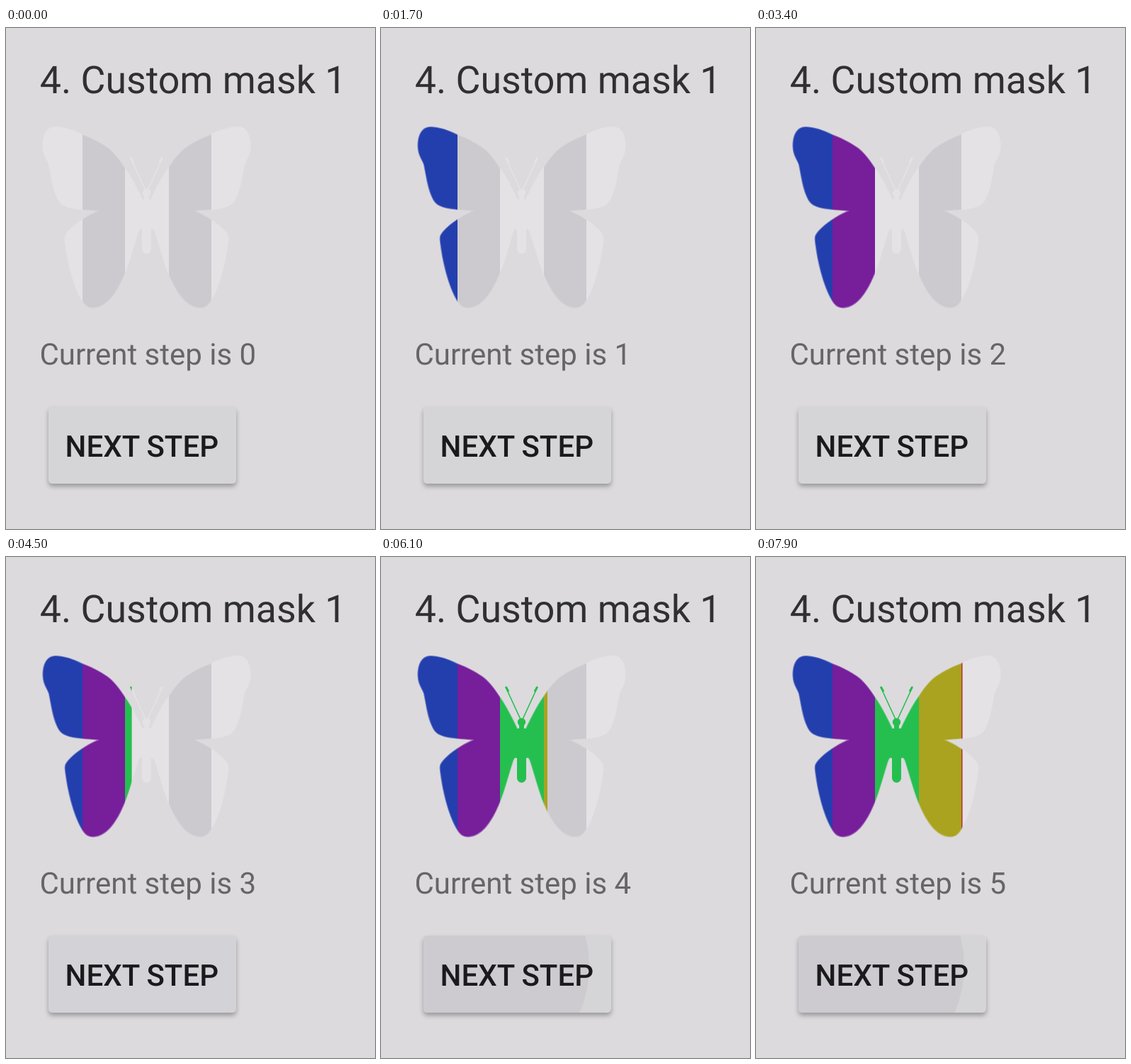
These frames come from a looping animation (521x707 px, 8 s). An HTML page with a canvas:

```html
<!DOCTYPE html>
<html lang="en">
<head>
<meta charset="utf-8">
<title>Custom mask steps</title>
<style>
  html, body { margin: 0; width: 100%; height: 100%; overflow: hidden; background: #dcdadd; }
  canvas, svg { position: absolute; left: 0; top: 0; width: 521px; height: 707px; }
  text { font-family: Roboto, sans-serif; text-rendering: geometricPrecision; }
</style>
</head>
<body>
<canvas id="stage" width="521" height="707"></canvas>
<svg viewBox="0 0 521 707">
  <text x="47.8" y="91.5" font-size="53.7" fill="#303033">4. Custom mask 1</text>
  <text id="label" x="47.4" y="475" font-size="42" fill="#666569">Current step is 0</text>
  <text x="83.6" y="604.7" font-size="42" font-weight="500" fill="#1a1a1c">NEXT STEP</text>
</svg>
<script>
const W = 521, H = 707, LOOP = 8000, TICK = 100;
const AXIS = 198.5;
const SPEED = 0.031; // px per ms
const EDGES = [48, 108, 168, 230, 290, 350];
const IDLE = ['#e4e2e5', '#cccacf'];
const COLORS = ['#233fae', '#771e9b', '#25bf4f', '#a9a31f', '#b92f2f'];

// press: button touched, start: fill begins, done: segment snaps to full
const STEPS = [
  { press: 600, start: 750, done: 1700 },
  { press: 2400, start: 2380, done: 3400 },
  { press: 4100, start: 4190, done: 5200 },
  { press: 6000, start: 5940, done: 7100 },
  { press: 7800, start: 7850, done: 9000 }
];

const ctx = document.getElementById('stage').getContext('2d');
const label = document.getElementById('label');
const layer = document.createElement('canvas');
layer.width = W;
layer.height = H;
const art = layer.getContext('2d');

const edge = `M193 242
  C188 232 179 212 168 197 C161 186 152 174 143 168
  C133 161 119 154 108 150 C96 144 82 139 70 139
  C58 139 51 150 51.5 168 C52 181 58 186 60 193
  C63 207 65 226 72 240 C76 249 81 251 90 254
  C101 257 114 257 128 258.5
  C115 264 98 275 88 286 C83 292 82 294 83 302
  C86 328 94 363 107 385 C111 392 116 395.5 123 395.5
  C143 395 157 374 168 347 C175 330 182 303 187 288
  Q189 283 191 284`;
const rim = new Path2D(edge);
const wing = new Path2D(edge + 'L198.5 284 L198.5 242 Z');

const antenna = new Path2D('M197 229 L176.5 184.5');
const tip = new Path2D('M179.5 189 L176.7 184');
const body = new Path2D();
body.arc(198.5, 233, 5.7, 0, 2 * Math.PI);
body.roundRect(195, 234, 7, 14, 2);
body.roundRect(192, 242, 13, 76.5, 6.5);

function bothSides(paint) {
  paint();
  art.save();
  art.translate(2 * AXIS, 0);
  art.scale(-1, 1);
  paint();
  art.restore();
}

function drawMask() {
  art.globalCompositeOperation = 'source-over';
  art.clearRect(0, 0, W, H);
  art.fillStyle = art.strokeStyle = '#000';
  art.lineCap = 'round';
  bothSides(() => {
    art.fill(wing);
    art.lineWidth = 1.6;
    art.stroke(antenna);
    art.lineWidth = 3;
    art.stroke(tip);
  });
  art.fill(body);
  art.globalCompositeOperation = 'source-atop';
}

function drawRim() {
  art.strokeStyle = 'rgba(228,226,229,.4)';
  art.lineWidth = 2;
  art.lineCap = 'butt';
  bothSides(() => art.stroke(rim));
}

function fillWidth(step, t, full) {
  if (t >= step.done) return full;
  return Math.min(full, Math.max(0, (t - step.start) * SPEED));
}

function drawButterfly(t) {
  drawMask();
  STEPS.forEach((step, i) => {
    const x = EDGES[i], w = EDGES[i + 1] - x;
    art.fillStyle = IDLE[i % 2];
    art.fillRect(x, 130, w, 280);
    art.fillStyle = COLORS[i];
    art.fillRect(x, 130, fillWidth(step, t, w), 280);
  });
  drawRim();
  ctx.drawImage(layer, 0, 0);
}

function drawButton(t) {
  const box = new Path2D();
  box.roundRect(60, 534.5, 265, 108.5, 5);
  ctx.save();
  ctx.shadowColor = 'rgba(0,0,0,.3)';
  ctx.shadowBlur = 6;
  ctx.shadowOffsetY = 4;
  ctx.fillStyle = '#d5d5d8';
  ctx.fill(box);
  ctx.restore();

  const step = STEPS.findLast(s => t >= s.press);
  const age = step ? t - step.press : LOOP;
  if (age >= 600) return;
  ctx.save();
  ctx.clip(box);
  ctx.globalAlpha = Math.min(1, Math.max(0, (500 - age) / 350));
  ctx.fillStyle = '#cdcbd0';
  ctx.beginPath();
  ctx.arc(121 + age * 0.04, 577, 100 + age * 0.69, 0, 2 * Math.PI);
  ctx.fill();
  ctx.restore();
}

function draw(now) {
  const t = Math.floor((now % LOOP) / TICK) * TICK;
  ctx.fillStyle = '#dcdadd';
  ctx.fillRect(0, 0, W, H);
  drawButterfly(t);
  drawButton(t);
  label.textContent = 'Current step is ' + STEPS.filter(s => t >= s.start).length;
}

const origin = performance.now();
function frame() {
  draw(performance.now() - origin);
  requestAnimationFrame(frame);
}
frame();
</script>
</body>
</html>
```
